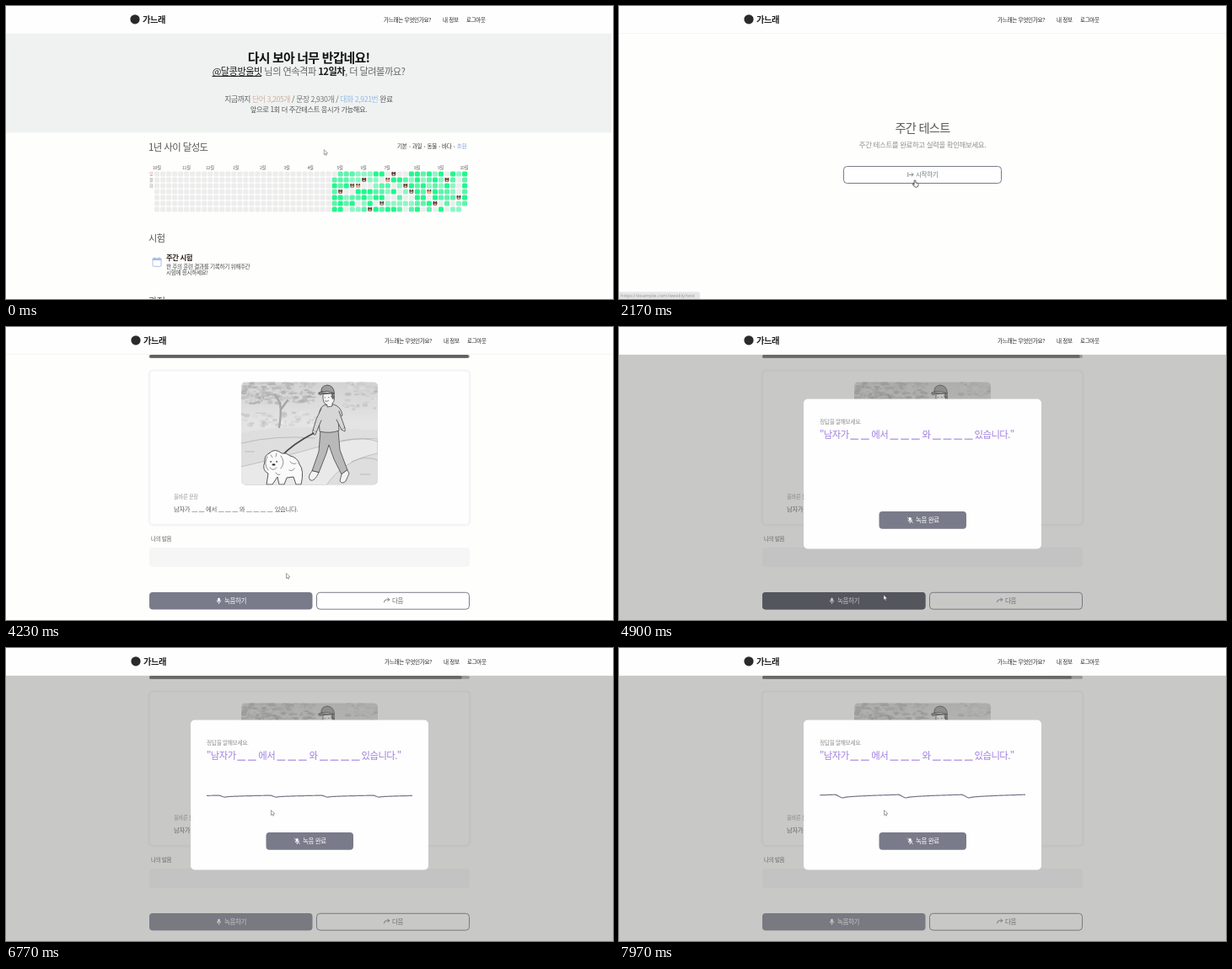
An HTML page for the animation above (8000 ms loop, 720 by 348 pixels).

```html
<!DOCTYPE html>
<html lang="ko">
<head>
<meta charset="utf-8">
<title>주간 테스트</title>
<style>
html, body { margin: 0; width: 100%; height: 100%; overflow: hidden; background: #fefefd; }
svg { display: block; }
text { font-family: "Noto Sans CJK KR", "Noto Sans KR", "Noto Sans", sans-serif; letter-spacing: -.05em; white-space: pre; }
.status { font-family: "Noto Sans", sans-serif; letter-spacing: 0; }
</style>
</head>
<body>
<svg id="stage" width="720" height="348" viewBox="0 0 720 348"></svg>
<script>
const LOOP = 8000;
const SLATE = '#797b8a';

// ---- markup helpers ----
const rect = (x, y, w, h, fill, r = 0, more = '') =>
  `<rect x="${x}" y="${y}" width="${w}" height="${h}" rx="${r}" fill="${fill}" ${more}/>`;
const text = (x, mid, size, fill, str, weight = 400, anchor = 'start') =>
  `<text x="${x}" y="${mid + size * .37}" font-size="${size}" fill="${fill}" font-weight="${weight}" text-anchor="${anchor}">${str}</text>`;
const centred = (x, mid, size, fill, str, weight) => text(x, mid, size, fill, str, weight, 'middle');
const span = (fill, str, weight = 400) => `<tspan fill="${fill}" font-weight="${weight}">${str}</tspan>`;
const line = (d, stroke, width = 1, fill = 'none', more = '') =>
  `<path d="${d}" stroke="${stroke}" stroke-width="${width}" fill="${fill}" stroke-linecap="round" stroke-linejoin="round" ${more}/>`;
const group = (id, body, more = '') => `<g id="${id}" ${more}>${body}</g>`;
const outline = (x, y, w, h) => rect(x, y, w, h, '#fefefe', 4, `stroke="${SLATE}"`);
const blanks = (starts, y, w, h, fill) => starts.map(x => rect(x, y, w, h, fill)).join('');

function random(seed) {
  return () => {
    seed = (seed * 1664525 + 1013904223) >>> 0;
    return seed / 4294967296;
  };
}

// ---- icons ----
const mic = (x, y, color, off) =>
  rect(x - 1.3, y - 3.4, 2.6, 4.4, color, 1.3) +
  line(`M${x - 2.3} ${y - .2}a2.3 2.3 0 0 0 4.6 0M${x} ${y + 2.2}v1.3`, color, .7) +
  (off ? line(`M${x - 3} ${y - 3.2}l6 6.4`, color, .8) : '');

const calendar = line('M175 300h8a1 1 0 0 1 1 1v7.3a1 1 0 0 1 -1 1h-8a1 1 0 0 1 -1 -1v-7.3a1 1 0 0 1 1 -1z', '#a9b9e0', .9) +
  rect(173.8, 299.6, 10.4, 2.5, '#a9b9e0') + line('M176.3 298.6v1.2M181.7 298.6v1.2', '#a9b9e0', .9);

// ---- home page ----
function heatmap() {
  const rnd = random(41), step = 7.02;
  const tones = ['#ededed', '#8ff5c6', '#5ff3ac', '#22f78d'];
  const furs = ['#8a4a35', '#77706a', '#e0926a', '#6f4436'];
  const animals = ['31 3', '33 2', '34 2', '35 1', '36 6', '38 5', '39 1', '40 0', '42 2', '43 3', '46 3', '47 5', '49 1', '51 4'];
  let out = '';
  for (let c = 0; c < 53; c++) for (let r = 0; r < 7; r++) {
    const x = 176 + c * step, y = 196.4 + r * step;
    const pick = rnd();
    let level = c < 30 || pick < .22 ? 0 : pick < .42 ? 1 : pick < .7 ? 2 : 3;
    if (c === 30) level = r ? 3 - r % 2 : 0;
    if (c === 52) level = r < 6 ? 3 - r % 2 : 0;
    if (c === 52 && r === 6) continue;
    const k = animals.indexOf(c + ' ' + r);
    out += rect(x, y, 6.1, 6.1, tones[k < 0 ? level : 0], 1.6);
    if (k >= 0) out += `<ellipse cx="${x + 3}" cy="${y + 3.3}" rx="2.6" ry="2.2" fill="${furs[k % 4]}"/>` +
      `<circle cx="${x + 1.4}" cy="${y + 1.5}" r=".9" fill="#4a332a"/><circle cx="${x + 4.6}" cy="${y + 1.5}" r=".9" fill="#4a332a"/>` +
      `<circle cx="${x + 3}" cy="${y + 4}" r="1" fill="#ecd3c2"/>`;
  }
  return out;
}

function home() {
  const months = { 174: 10, 209: 11, 237: 12, 269: 1, 301: 2, 329.5: 3, 357.5: 4, 392.5: 5, 420.5: 6, 448.5: 7, 484: 8, 512: 9, 538.5: 10 };
  const themes = ['기본', '과일', '동물', '바다', '초원'];
  return rect(0, 32.5, 718, 118, '#f0f2f2') +
    centred(359, 61.5, 14.9, '#111', '다시 보아 너무 반갑네요!', 700) +
    centred(359, 77.6, 11.25, '#666', span('#1c1c1c', '@달콩방울빗', 500) + ' 님의 연속격파 ' + span('#1c1c1c', '12일차', 700) + ', 더 달려볼까요?') +
    rect(244.5, 82.8, 58.5, 1.2, '#222') +
    centred(359, 111.2, 8.85, '#5e5e5e', '지금까지 ' + span('#cdb0a0', '단어 3,205개') + ' / ' + span('#777', '문장 2,930개') + ' / ' + span('#94bce2', '대화 2,921번') + ' 완료') +
    centred(359, 123.4, 8.3, '#555', '앞으로 1회 더 주간테스트 응시가 가능해요.') +
    text(169, 167.3, 11.4, '#555', '1년 사이 달성도') +
    themes.map((s, i) => text(464 + i * 17.7, 167, 6.6, i < 4 ? '#333' : '#86a0cc', s) +
      (i < 4 ? `<circle cx="${479 + i * 17.6}" cy="167" r=".6" fill="#444"/>` : '')).join('') +
    Object.entries(months).map(([x, m]) => text(+x, 192.5, 5.2, '#666', m + '월')).join('') +
    ['일', '월', '화'].map((s, i) => text(170, 199.5 + i * 7, 4.8, i ? '#888' : '#c08a80', s)).join('') +
    heatmap() +
    text(169, 275.8, 11.2, '#555', '시험') + calendar +
    text(190, 299, 8.4, '#2a1c18', '주간 시험', 700) +
    text(190, 309.2, 6.6, '#444', '한 주의 훈련 결과를 기록하기 위해주간') +
    text(190, 317, 6.6, '#444', '시험에 응시하세요!') +
    text(169, 350.5, 11.2, '#555', '과정');
}

// ---- start page ----
function startLabel(color) {
  return line('M342.8 198v4.6M344.5 200.3h4.5M347.2 198.5l1.9 1.8l-1.9 1.8', color, .9) +
    text(352, 200.3, 7.6, color, '시작하기');
}
const start = () =>
  centred(360, 145, 14.2, '#585858', '주간 테스트') +
  centred(360, 164.6, 8.5, '#8f8f8f', '주간 테스트를 완료하고 실력을 확인해보세요.') +
  outline(266.5, 190.5, 187, 20) + startLabel('#747c8a') +
  group('startHover', rect(266, 190, 188, 21, SLATE, 4) + startLabel('#fff'));

// ---- test page ----
function picture() {
  const rnd = random(9);
  let leaves = '';
  const foliage = (n, x, y, w, h, dark) => {
    for (let i = 0; i < n; i++) {
      const g = dark + rnd() * 50 | 0;
      leaves += `<ellipse cx="${x + rnd() * w}" cy="${y + rnd() * h}" rx="${1 + rnd() * 3.2}" ry="${.8 + rnd() * 1.6}" fill="rgb(${g},${g},${g})" opacity=".65"/>`;
    }
  };
  foliage(190, 281, 65, 84, 26, 165);
  foliage(60, 402, 65, 40, 34, 178);
  foliage(70, 280, 102, 90, 16, 190);
  const ink = '#444', skin = '#f3f3f3', knit = '#d6d6d6';
  return `<clipPath id="frame"><rect x="279" y="65.5" width="162" height="122" rx="5"/></clipPath>
    <linearGradient id="sky" x2="0" y2="1"><stop stop-color="#d2d2d2"/><stop offset=".4" stop-color="#e4e4e4"/><stop offset="1" stop-color="#dcdcdc"/></linearGradient>
    <g clip-path="url(#frame)">` + rect(279, 65, 162, 123, 'url(#sky)') + leaves +
    line('M324 119Q327 103 325 90L319 80M326 98L334 87', '#a6a6a6', 2.4) +
    line('M279 126Q330 114 441 123V188H279Z', 'none', 0, '#dedede') +
    line('M279 166Q330 154 372 142T441 133V150Q400 158 380 188H279Z', '#b0b0b0', .7, '#e9e9e9') +
    line('M279 138Q320 128 366 132M398 135Q425 130 441 136M410 160Q425 152 441 158M284 148h10M420 175h12', '#ababab', .7) +
    // walker: legs, shoes, sweater, arms, head, cap
    line('M373 123L371 148L363 171L371 173L380 150L383 140L389 157L398 175L405 170L396 146L394 122Z', ink, .8, '#b9b9b9') +
    line('M363 171Q357 178 361 182Q366 184 371 173ZM398 175L396 183Q399 187 403 183L407 174L405 170Z', ink, .8, skin) +
    line('M377 93Q371 96 371 108L372 124Q384 127 395 123L394 108L399 105Q398 95 389 92Z', ink, .8, knit) +
    line('M374 97Q367 109 364 123L368 125L374 111M395 100L402 120L398 122L392 110', ink, .8, knit) +
    line('M364 123Q362 128 367 128L368 125M402 120L402 124L398 122', ink, .8, skin) +
    line('M376 80Q375 91 381 92.5V95L387 94V91Q391 87 389 79Z', ink, .8, skin) +
    line('M387 79Q390 82 388 86L386 83Z', ink, .5, '#666') +
    line('M378.2 83.8h.5M382.5 83.5h.5M378.5 88q2 1 4 -.4', ink, .7) +
    line('M374 77Q373 70 381 69Q389 69.5 389.5 79Q382 75 374 77Z', ink, .8, '#9d9d9d') +
    line('M375 77Q368 77.5 372 80.5Q381 77 389 79.5', ink, .8, '#858585') +
    line('M326 154Q340 139 365 126', '#4a4a4a', 1.8) +
    // dog
    line('M312 150Q319 143 327 150Q333 149 337 153Q346 155 348 163Q354 170 350 187H344L341 178L333 179L330 187H324L322 178L316 187H309L311 174Q303 170 307 160Q306 153 312 150Z', ink, .9, '#fafafa') +
    line('M310 154Q305 163 311 170M326 153Q332 161 326 168M313 167q4 5 8 0M337 160q4 4 7 2M336 170q4 2 6 -2M320 173q2 4 5 2M314 152l2 3M321 150l-1 4', '#777', .8) +
    line('M314 160h.3M321 160h.3', '#222', 1.6) + line('M316.5 163.5h2', '#222', 1.8) + '</g>';
}

const recordLabel = color => mic(252.5, 325.1, color) + text(259, 325.2, 7.5, color, '녹음하기');

function test() {
  return rect(170, 33, 380, 3.8, '#b0b0b0', 1.9) +
    `<rect id="bar" x="170" y="33" height="3.8" rx="1.9" fill="#606060"/>` +
    group('quiz',
      rect(169.4, 51.2, 381.2, 184.6, 'none', 5, 'stroke="#f7f7f7" stroke-width="2"') +
      rect(170.3, 52, 379.4, 182.6, '#fefefe', 4, 'stroke="#ededed" stroke-width=".8"') + picture() +
      text(199, 201.5, 6.3, '#9a9a9a', '올바른 문장') +
      text(199, 216, 7.4, '#5c5c5c', '남자가') + text(237, 216, 7.4, '#5c5c5c', '에서') +
      text(276.7, 216, 7.4, '#5c5c5c', '와') + text(318.7, 216, 7.4, '#5c5c5c', '있습니다.') +
      blanks([220.5, 228.7, 252, 260.2, 268.4, 285.2, 293.4, 301.6, 309.8], 219, 6.6, .7, '#888') +
      text(172, 252, 6.5, '#5c5c5c', '나의 발음') +
      rect(170, 262, 380, 23, '#f6f6f7', 4) +
      rect(170, 315, 193.5, 20.5, SLATE, 4) +
      rect(170, 315, 193.5, 20.5, '#3d404e', 4, 'id="recordHover"') + recordLabel('#fff') +
      outline(368.5, 315.3, 181, 19.9) +
      line('M448.5 326.8q0 -3 3 -3h3M453 322l1.8 1.8l-1.8 1.8', '#6c6c72', .9) +
      text(458, 325.2, 7.5, '#6c6c72', '다음'));
}

function modal() {
  const violet = '#a17fe0', big = (x, s) => text(x, 128, 11.4, violet, s);
  return rect(0, 33, 720, 315, 'rgba(118,118,116,.4)') +
    rect(219, 85.5, 282, 178, '#fefefe', 5) +
    text(238, 113, 6.7, '#8d8d8d', '정답을 말해보세요.') +
    big(238, '"남자가') + big(299.3, '에서') + big(359.6, '와') + big(421.6, '있습니다."') +
    blanks([274.3, 286.9, 321.5, 334.2, 346.9, 372, 384.6, 397.2, 409.8], 132.6, 9.8, 1.1, violet) +
    rect(308.5, 219, 103.5, 20.7, SLATE, 4) + mic(345.3, 229.3, '#fff', true) +
    text(352, 229.5, 7.5, '#fff', '녹음 완료') +
    `<path id="wave" fill="none" stroke="#74768a" stroke-width="1.2" stroke-linejoin="round"/>`;
}

// ---- header, status strip and pointer ----
const header = rect(-2, 0, 724, 32.5, '#fefefe') +
  '<circle cx="154" cy="15.8" r="5.6" fill="#2a2a2a"/>' +
  text(163, 16, 10.3, '#222', '가느래', 700) +
  text(449, 16.2, 6.6, '#222', '가느래는 무엇인가요?') +
  text(519, 16.2, 6.6, '#222', '내 정보') + text(547, 16.2, 6.5, '#222', '로그아웃');

const status = line('M0 339.5H93.5Q96 339.5 96 342V348H0Z', 'none', 0, '#dcdddd') +
  '<text class="status" x="2" y="346.3" font-size="5.7" fill="#777">https://example.com/weekly/test</text>';

const pointer = group('arrow', line('M0 0V6.6L1.5 5.3L2.5 7.5L3.6 7L2.6 4.9L4.6 4.7Z', '#666', .7, '#fff', 'transform="scale(.85)"')) +
  group('hand', line('M-.9 5V.9Q0 -.4 .9 .9V3.4Q3.8 3.4 4 5V6.6Q3.6 8.7 1.6 8.8Q-.8 8.7 -2.8 5.2Q-2 4.2 -.9 5.4Z', '#333', .8, '#fff'));

document.getElementById('stage').innerHTML =
  rect(0, 0, 720, 348, '#fefefd') +
  group('home', home()) + group('start', start()) + group('test', test()) + group('modal', modal()) +
  rect(0, 32, 720, .8, '#ececec', 0, 'id="rule"') +
  group('header', header) + group('status', status) + group('pointer', pointer);

// ---- animation ----
const el = id => document.getElementById(id);
const show = (id, on) => el(id).setAttribute('display', on ? 'inline' : 'none');
const fade = (id, a) => el(id).setAttribute('opacity', a);
const smooth = (a, b, t) => {
  const u = Math.min(1, Math.max(0, (t - a) / (b - a)));
  return u * u * (3 - 2 * u);
};

// time, x, y of the pointer tip
const moves = [[830, 377.3, 171], [1470, 248, 304], [2000, 248, 304], [2160, 351, 206.5], [3730, 351, 206.5],
  [4230, 332.5, 293], [4500, 314, 318.5], [4950, 314, 318.5], [5620, 314.5, 193]];

function pointerAt(t) {
  const i = moves.findIndex(m => t < m[0]);
  if (i === 0) return moves[0].slice(1);
  if (i < 0) return moves[moves.length - 1].slice(1);
  const [ta, xa, ya] = moves[i - 1], [tb, xb, yb] = moves[i], k = smooth(ta, tb, t);
  return [xa + (xb - xa) * k, ya + (yb - ya) * k];
}

function wavePath(t) {
  const k = (t - 6770) / 1200;
  const period = 61 + 14 * k;
  const peak = 250 + 4 * k + 26 * Math.sin(k * Math.PI * 24);
  const amp = .3 + .7 * smooth(5900, 6700, t) + 8.5 * Math.exp(-(((t - 7080) / 130) ** 2)) + .9 * smooth(7300, 7900, t);
  const hiss = .6 * (1 - smooth(5800, 6400, t));
  const rnd = random(Math.floor(t / 33) * 977);
  let d = '';
  for (let x = 238; x <= 482; x++) {
    const u = ((x - peak) / period % 1 + 1) % 1;
    const v = u < .14 ? Math.cos(Math.PI * u / .14) : 2 * Math.sqrt((u - .14) / .86) - 1;
    d += (d ? 'L' : 'M') + x + ' ' + (176.1 - amp * v + hiss * (rnd() - .5)).toFixed(2);
  }
  return d;
}

function draw(t) {
  const isHome = t < 1770, isTest = t >= 2830;
  show('home', isHome);
  show('start', !isHome && !isTest);
  show('test', isTest);
  show('quiz', t >= 3030);
  show('modal', t >= 4900);
  show('rule', !isHome);
  el('header').setAttribute('transform', `translate(${isHome ? -1 : 0})`);

  fade('startHover', smooth(2170, 2370, t));
  fade('recordHover', smooth(4430, 4670, t) * (1 - smooth(4960, 5150, t)));
  fade('status', smooth(1330, 1450, t) * (1 - smooth(2080, 2340, t)));

  el('bar').setAttribute('width', 380 * (1 - Math.max(0, t - 3880) / 120000));
  show('wave', t >= 5400);
  if (t >= 5400) el('wave').setAttribute('d', wavePath(t));

  const [x, y] = pointerAt(t);
  const hand = (t > 1330 && t < 2020) || (t > 2130 && t < 2830) || (t > 4430 && t < 4900);
  el('pointer').setAttribute('transform', `translate(${x} ${y})`);
  show('hand', hand);
  show('arrow', !hand);
}

const begin = performance.now();
function tick() {
  draw((performance.now() - begin) % LOOP);
  requestAnimationFrame(tick);
}
tick();
</script>
</body>
</html>
```
